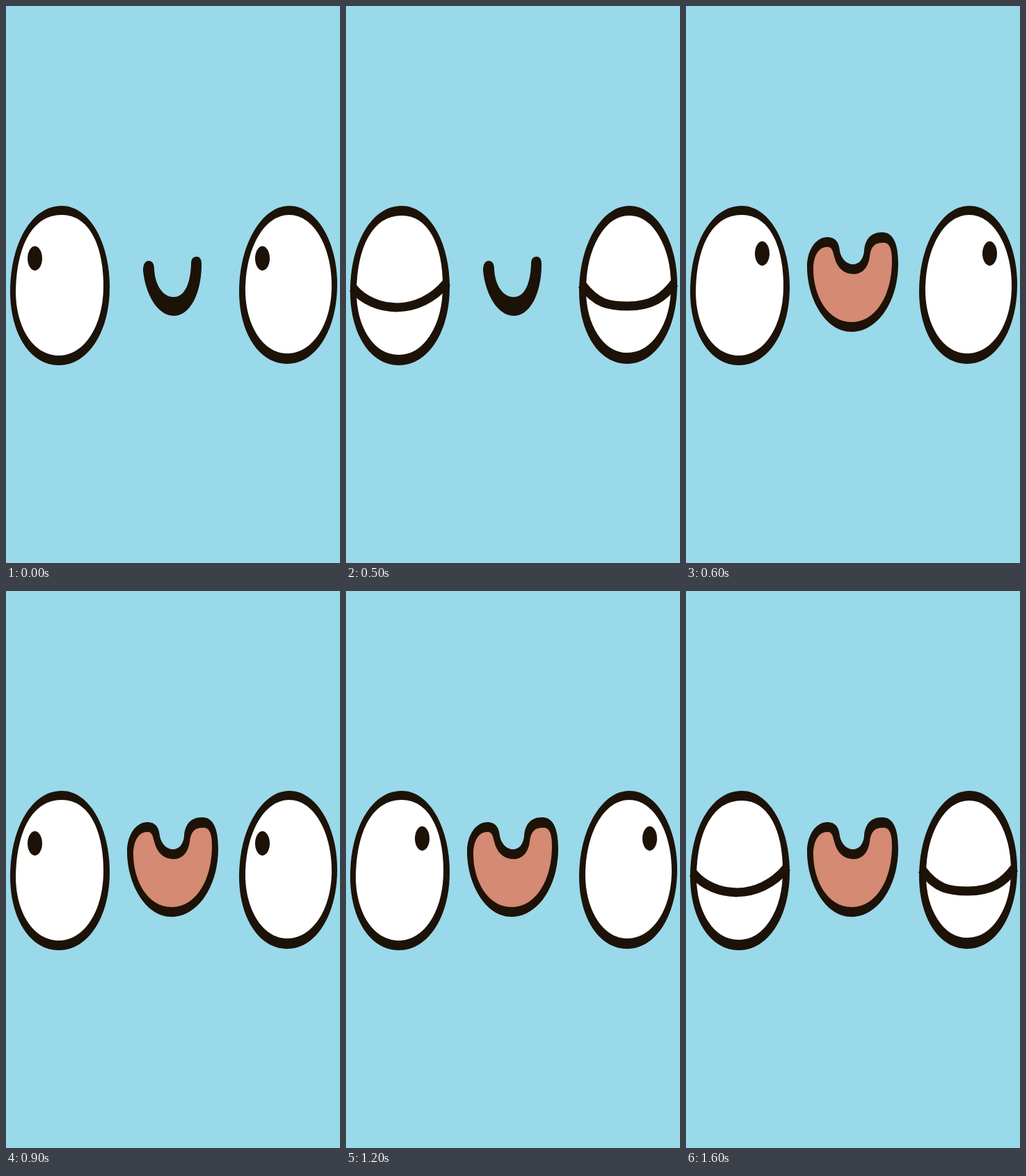
An HTML page for the animation above (1700 ms loop, 480 by 800 pixels).

```html
<!DOCTYPE html>
<html lang="en">
<head>
<meta charset="utf-8">
<title>Blinking face</title>
<style>
  html, body { margin: 0; width: 100%; height: 100%; overflow: hidden; background: #9ad9ea; }
  svg { display: block; width: 100%; height: 100%; }
  .ink { fill: #1d1207; }
  .white { fill: #fff; stroke: #1d1207; stroke-width: 0; }
  .lid { fill: none; stroke: #1d1207; stroke-width: 13; }
  .blink .white { stroke-width: 2; }
</style>
</head>
<body>
<svg viewBox="0 0 480 800">
  <g id="eyes">
    <path class="ink" d="M80 287C120 287 149 340 149 404C149 468 118 516 76 516C34 516 6 470 6 410C6 342 36 287 80 287Z"/>
    <path class="white" d="M80 300C120 300 140 345 140 402C140 460 112 502 76 502C38 502 14 460 14 410C15 345 38 300 80 300Z"/>
    <path class="ink" d="M407 287C446 287 476 338 476 400C476 464 446 514 404 514C364 514 335 470 335 410C335 342 368 287 407 287Z"/>
    <path class="white" d="M407 300C442 300 468 346 468 402C468 456 441 499 404 499C369 499 344 458 344 408C344 348 371 300 407 300Z"/>
  </g>
  <g id="pupils" class="ink">
    <ellipse cx="41.5" cy="362.5" rx="10.5" ry="17.5"/>
    <ellipse cx="368.5" cy="362.5" rx="10.5" ry="17.5"/>
  </g>
  <g id="lids" class="lid">
    <path d="M10 405C40 441 105 446 145 397"/>
    <path d="M339 400C360 428 378 431 405 431C440 431 457 418 472 398"/>
  </g>
  <path id="smile" class="ink" d="M197 380C197 371 200 366 205 366C211 366 213 371 213 378C214 400 225 418 241 418C256 418 265 400 266 371C266 364 268 360 274 360C279 360 281 364 281 371C281 412 265 445 241 445C217 445 200 412 197 380Z"/>
  <g id="mouth">
    <path class="ink" d="M174 374C174 350 187 332 203 332C216 332 220 341 221 352C223 363 231 371 240 371C249 371 255 363 256 352C257 336 265 325 282 325C297 325 305 340 305 370C305 425 275 468 238 468C200 468 174 420 174 374Z"/>
    <path fill="#d48a73" d="M183 378C183 360 190 346 203 346C210 346 211 352 213 360C217 376 227 385 240 385C254 385 262 375 264 360C266 345 271 340 284 340C293 340 296 350 296 366C296 415 273 454 238 454C203 454 183 415 183 378Z"/>
  </g>
</svg>
<script>
  const LOOP = 1700;
  const part = id => document.getElementById(id);
  const show = (id, on) => part(id).setAttribute('visibility', on ? 'visible' : 'hidden');
  const start = performance.now();

  function draw(now) {
    const t = Math.max(0, now - start) % LOOP;
    const blink = (t >= 500 && t < 600) || t >= 1600;
    const lookRight = (t >= 600 && t < 900) || t >= 1200;
    const open = t >= 600;
    part('eyes').classList.toggle('blink', blink);
    show('lids', blink);
    show('pupils', !blink);
    part('pupils').setAttribute('transform', lookRight ? 'translate(68 -7)' : '');
    show('smile', !open);
    show('mouth', open);
    requestAnimationFrame(draw);
  }
  draw(start);
</script>
</body>
</html>
```
